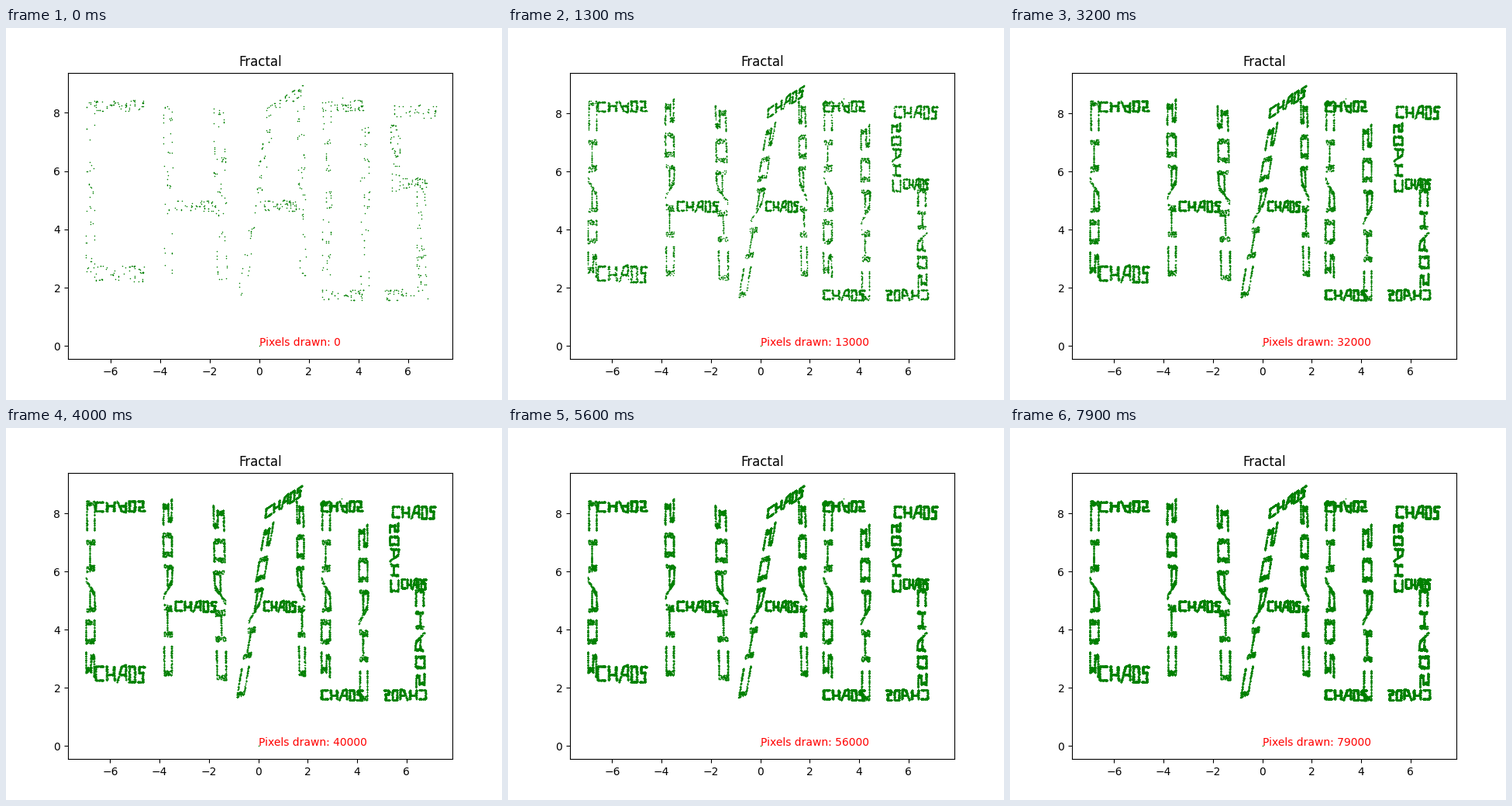
Recreate the animation shown at these times as a matplotlib script. Size 640x480 px, loop 8 s.

```python
import random

import matplotlib.pyplot as plt
import numpy as np
from matplotlib.animation import FuncAnimation

FRAMES, STEP, MARGIN = 80, 1000, 0.05
THIN, TALL = 0.053, 0.429        # scale of the word across and along a stroke
HIGH, LOW = 5.43, 4.569          # heights of the long uprights


def stroke(x, y, along, across):
    """Affine copy of the word: it runs along one vector and rises on the other."""
    (a, c), (b, d) = along, across
    return lambda px, py: (a * px + b * py + x, c * px + d * py + y)


def bar(x, y, width, rise=THIN):
    return stroke(x, y, (width, 0), (0, rise))


def post(x, y, height=TALL, rise=THIN):
    return stroke(x, y, (0, height), (rise, 0))


LETTERS = {
    "C": [post(-7.083, HIGH, -TALL), bar(-5.619, 8.513, 0.143, -THIN),
          bar(-5.619, 2.057, 0.143, 0.083)],
    "H": [post(-3.952, HIGH), bar(-2.555, 4.536, 0.119),
          stroke(-1.226, 5.235, (-0.012, 0.424), (-0.065, 0.002))],
    "A": [stroke(-0.421, LOW, (0.085, 0.42), (0.051, 0.016)),
          stroke(0.976, 8.113, (0.104, 0.057), (0.005, THIN)),
          stroke(1.934, 5.37, (-0.008, 0.424), (-0.042, 0.004)),
          bar(0.861, 4.536, 0.093)],
    "O": [post(2.447, HIGH, -TALL), bar(3.363, 8.513, 0.119, -THIN),
          bar(3.363, 1.487, 0.119), post(3.972, LOW)],
    "S": [bar(6.275, 7.716, 0.124, 0.063), post(5.215, 6.483, 0.167),
          bar(6.279, 5.298, 0.071), post(6.805, 3.714, -0.238, -THIN),
          bar(5.941, 1.487, -0.121)],
}


def chaos_game(count, seed=4):
    rng = random.Random(seed)
    strokes = sum(LETTERS.values(), [])
    points = [(0.0, 0.0)]
    move = LETTERS["O"][1]
    while len(points) < count:
        points.append(move(*points[-1]))
        move = rng.choice(strokes)
    return np.array(points)


def padded(low, high):
    pad = MARGIN * (high - low)
    return low - pad, high + pad


points = chaos_game(FRAMES * STEP)

fig, ax = plt.subplots(figsize=(6.4, 4.8), dpi=100)
ax.set_title("Fractal")
dots, = ax.plot([], [], "o", color="green", markersize=1.1, markeredgewidth=0)
label = ax.text(0, 0, "", color="red")


def update(frame):
    shown = points[:(frame + 1) * STEP]
    dots.set_data(shown[:, 0], shown[:, 1])
    label.set_text(f"Pixels drawn: {frame * STEP}")
    # the view settles quickly as the outermost points are reached
    gap = 0.5 ** frame
    ax.set_xlim(padded(-7.0, 7.147 - 0.057 * gap))
    ax.set_ylim(padded(0, 8.95 - 0.025 * gap))
    return dots, label


anim = FuncAnimation(fig, update, frames=FRAMES, interval=100,
                     repeat=True, repeat_delay=0, blit=False)
plt.show()
```
